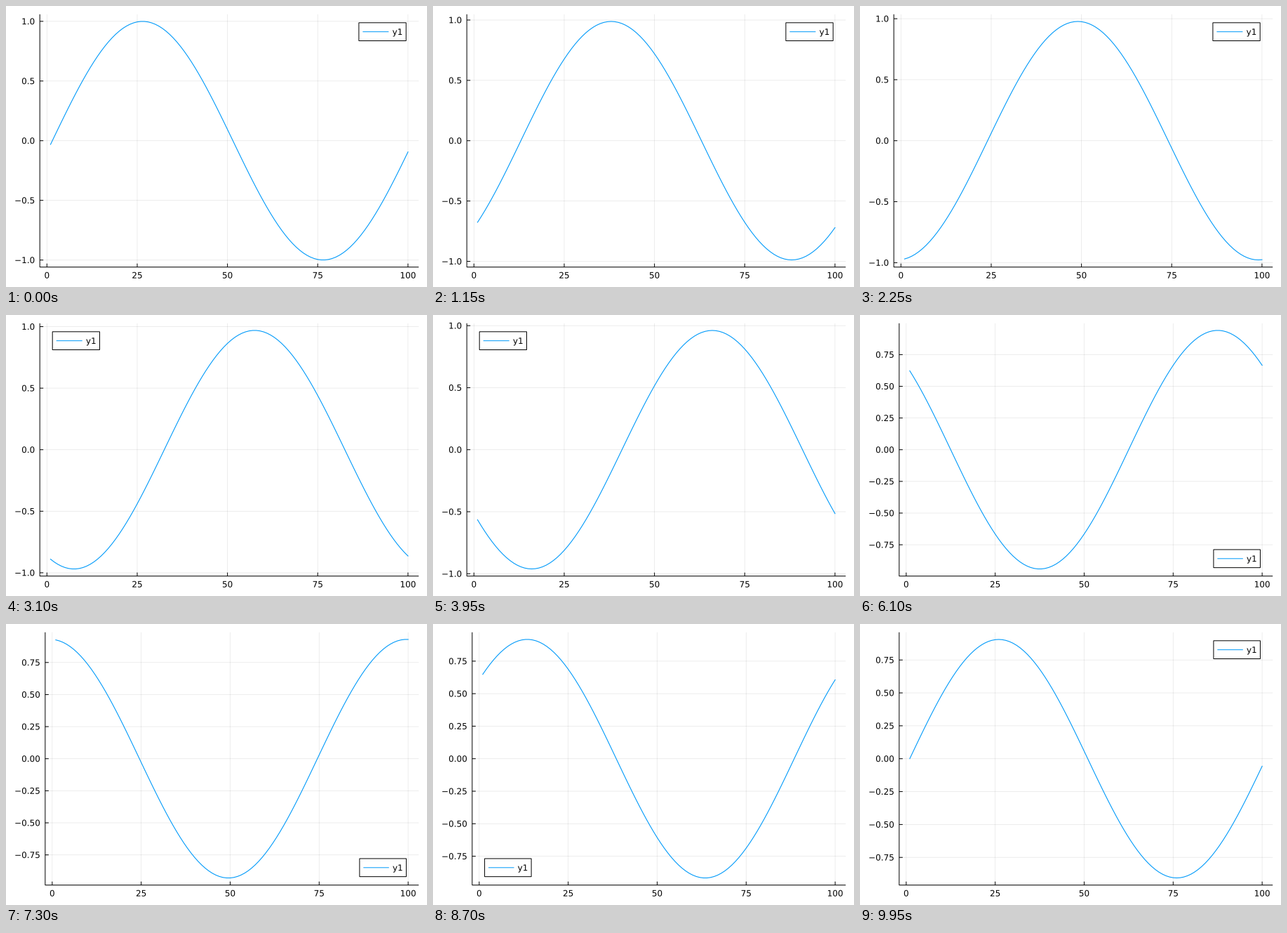
A matplotlib script that plays this animation: 600x400 px, repeating every 10 s.

```python
import numpy as np
import matplotlib
import matplotlib.pyplot as plt
from matplotlib.animation import FuncAnimation
from matplotlib.patches import PathPatch, Rectangle
from matplotlib.textpath import TextPath
from matplotlib.transforms import Affine2D

W, H, DPI = 600, 400, 100
FRAMES, INTERVAL = 200, 50
TOP, BOTTOM, RIGHT = 11.81, 371.65, 588.19
EM = 12
CAP = 0.729 * EM
DIGIT = 0.636 * EM
BLUE = "#009afa"

matplotlib.rcParams["font.family"] = "DejaVu Sans"
matplotlib.rcParams["path.snap"] = False

fig = plt.figure(figsize=(W / DPI, H / DPI), dpi=DPI, facecolor="white")
ax = fig.add_axes([0, 0, 1, 1])
x = np.arange(1, 101)


def wave(n):
    """Sine after n upwind steps at Courant number 1/2 on 100 periodic cells."""
    return np.cos(np.pi / 100) ** n * np.sin(2 * np.pi * (x - 1 - n / 2) / 100)


def widen(values):
    lo, hi = values.min(), values.max()
    pad = 0.03 * (hi - lo)
    return lo - pad, hi + pad


def line(xs, ys, color="black", width=1.0, **kw):
    ax.plot(xs, ys, color=color, lw=width * 72 / DPI, **kw)


def label(px, cy, text, align=0.0):
    """Text centred on cy; align 0, 0.5 or 1 puts its left, middle or right at px."""
    advance = sum({".": 0.318, "\u2212": 0.838, "y": 0.592}.get(c, 0.636)
                  for c in text) * EM
    place = Affine2D().scale(1, -1).translate(px - align * advance, cy + CAP / 2)
    path = TextPath((0, 0), text, size=EM).transformed(place)
    ax.add_patch(PathPatch(path, fc="black", lw=0, zorder=6))


def legend_corner(n):
    """Side and height of the corner farthest from the curve."""
    if n < 50 or n >= 199:
        return "right", "top"
    if n < 99:
        return "left", "top"
    return ("right" if n < 149 else "left"), "bottom"


def draw_legend(n, left):
    width = RIGHT - left
    unit = width / 45
    box_w, box_h = 4.5 * unit + 13.3, 25.7
    side, level = legend_corner(n)
    bx = left + width / 30 if side == "left" else RIGHT - width / 30 - box_w
    by = TOP + 12 if level == "top" else BOTTOM - 12 - box_h
    mid = by + box_h / 2
    ax.add_patch(Rectangle((bx, by), box_w, box_h, fc="white", ec="black",
                           lw=72 / DPI, zorder=4))
    line([bx + unit / 2, bx + 3.5 * unit], [mid, mid], BLUE, zorder=5)
    label(bx + 4 * unit - 0.3, mid, "y1")


def draw(frame):
    n = frame + 1
    y = wave(n)
    (x0, x1), (y0, y1) = widen(x), widen(y)

    coarse = y1 >= 1
    left = 48.2 if coarse else 48.2 + DIGIT
    step, digits = (0.5, 1) if coarse else (0.25, 2)
    y_ticks = step * np.arange(-2, 3) if coarse else step * np.arange(-3, 4)

    def to_x(v):
        return left + (v - x0) / (x1 - x0) * (RIGHT - left)

    def to_y(v):
        return BOTTOM - (v - y0) / (y1 - y0) * (BOTTOM - TOP)

    ax.clear()
    ax.set_xlim(0, W)
    ax.set_ylim(H, 0)
    ax.axis("off")

    grid = dict(color="black", width=0.8, alpha=0.09, zorder=1,
                solid_capstyle="butt")
    tick = dict(zorder=3, solid_capstyle="butt")
    for v in range(0, 101, 25):
        px = to_x(v)
        line([px, px], [TOP, BOTTOM], **grid)
        line([px, px], [BOTTOM, BOTTOM - 5], **tick)
        label(px, 383.2, str(v), 0.5)
    for v in y_ticks:
        py = to_y(v)
        line([left, RIGHT], [py, py], **grid)
        line([left, left + 5], [py, py], **tick)
        label(left - 7, py, f"{v:.{digits}f}".replace("-", "\u2212"), 1)

    line([left, left, RIGHT], [TOP, BOTTOM, BOTTOM], zorder=3,
         solid_capstyle="butt", solid_joinstyle="miter")
    line(to_x(x), to_y(y), BLUE, 1.1, zorder=2)
    draw_legend(n, left)
    return []


anim = FuncAnimation(fig, draw, frames=FRAMES, interval=INTERVAL,
                     init_func=lambda: [], repeat=True, repeat_delay=0)
plt.show()
```
